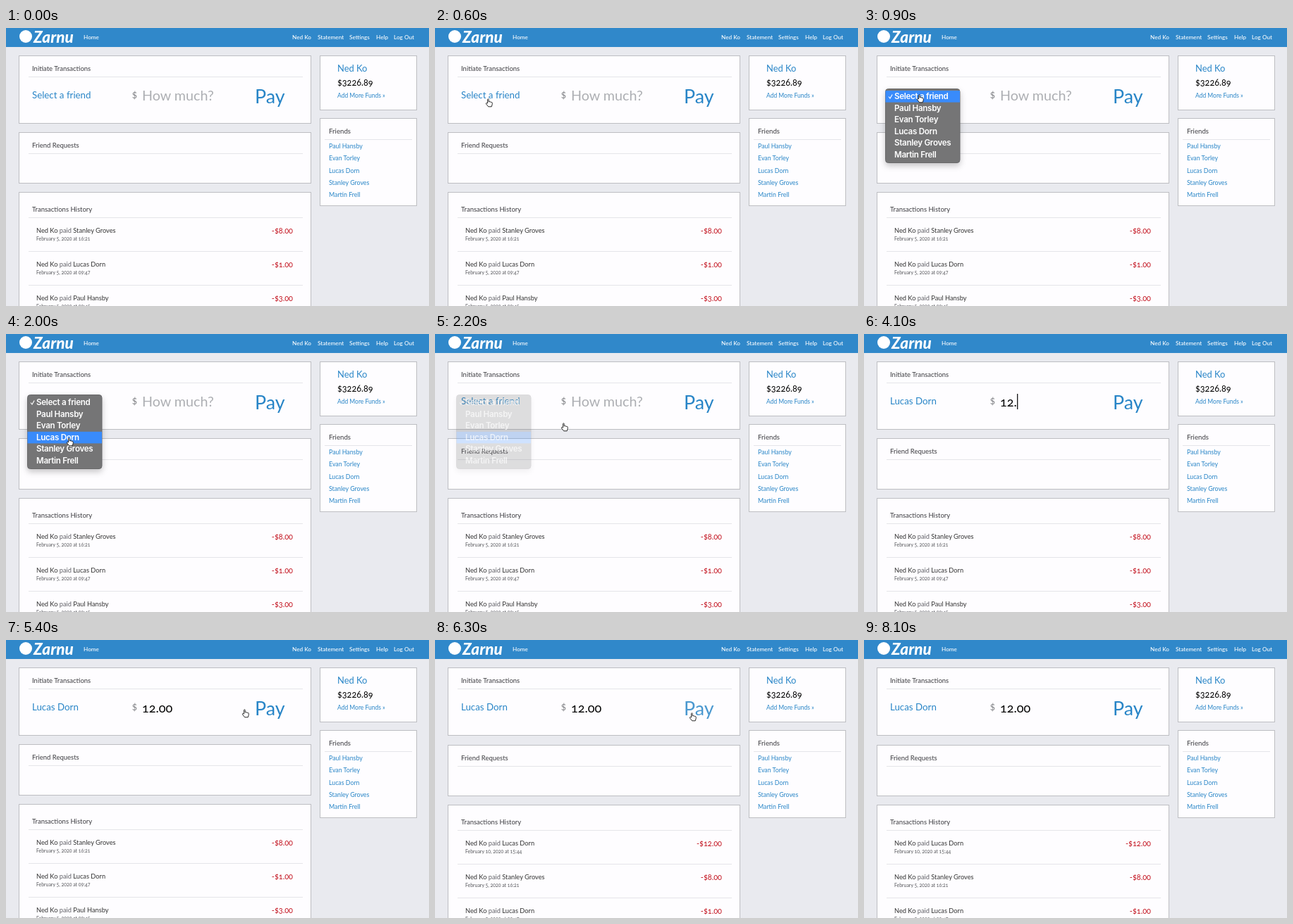
These frames come from a looping animation (600x395 px, 8300 ms). An HTML page:

```html
<!DOCTYPE html>
<html lang="en">
<head>
<meta charset="utf-8">
<title>Payment page</title>
<style>
  html, body { margin: 0; width: 100%; height: 100%; overflow: hidden; background: #e9eaef; }
  svg { display: block; width: 100%; height: 100%; }
  text { font-family: Lato, "Open Sans", sans-serif; font-variant-numeric: oldstyle-nums; white-space: pre; }
  .menu text { font-family: Inter, Roboto, sans-serif; font-weight: 600; letter-spacing: -.3px; }
  .panel { fill: #fefdff; stroke: #bdbec2; }
  .rule { stroke: #e5e5e9; }
</style>
</head>
<body>
<svg id="stage" viewBox="0 0 600 395">
  <defs>
    <filter id="shadow" x="-20%" y="-20%" width="140%" height="150%">
      <feDropShadow dx="0" dy="4" stdDeviation="4" flood-opacity=".22"/>
    </filter>
  </defs>
</svg>
<script>
const LOOP = 8300, STEP = 100;
const BLUE = '#2885c7', DARK = '#3c3c40', RED = '#c2101c';
const owner = 'Ned Ko';
const friends = ['Paul Hansby', 'Evan Torley', 'Lucas Dorn', 'Stanley Groves', 'Martin Frell'];
const picked = friends[2];
const stage = document.getElementById('stage');

function add(parent, tag, attrs = {}, content = '') {
  const node = document.createElementNS('http://www.w3.org/2000/svg', tag);
  for (const key in attrs) node.setAttribute(key, attrs[key]);
  node.textContent = content;
  return parent.appendChild(node);
}
const group = (parent, attrs) => add(parent, 'g', attrs);
const label = (parent, x, y, size, fill, content, extra = {}) =>
  add(parent, 'text', { x, y, 'font-size': size, fill, ...extra }, content);
const panel = (parent, x, y, width, height) =>
  add(parent, 'rect', { class: 'panel', x: x + .5, y: y + .5, width, height });
const rule = (parent, x1, x2, y) => add(parent, 'line', { class: 'rule', x1, x2, y1: y + .5, y2: y + .5 });
const show = (node, on) => node.setAttribute('visibility', on ? 'visible' : 'hidden');

// Header
add(stage, 'rect', { width: 600, height: 27, fill: '#3088ca' });
add(stage, 'circle', { cx: 28, cy: 12, r: 9, fill: '#fff' });
label(stage, 39, 20.5, 22.5, '#fff', 'Zarnu', { 'font-weight': 800, 'font-style': 'italic' });
[[110, 'Home'], [406, owner], [442, 'Statement'], [487, 'Settings'], [525, 'Help'], [550, 'Log Out']]
  .forEach(([x, word]) => label(stage, x, 15.6, 8.2, '#fff', word, { 'font-weight': 500 }));

// Payment form
panel(stage, 18, 39, 414, 96);
label(stage, 37, 61, 9.5, DARK, 'Initiate Transactions');
rule(stage, 32, 421, 69);
const choice = label(stage, 37, 100, 13.3, BLUE, '');
label(stage, 178.5, 100, 14.4, '#88898d', '$');
const hint = label(stage, 193, 102.5, 19.7, '#adafb3', 'How much?');
const amount = label(stage, 193, 102.5, 18, '#000', '');
const caret = add(stage, 'rect', { y: 85, width: 1.2, height: 22, fill: '#000' });
const pay = label(stage, 353, 106.5, 26.8, BLUE, 'Pay');

// Lower panels
const lower = group(stage);
panel(lower, 18, 148, 414, 72);
label(lower, 37, 170, 9.5, DARK, 'Friend Requests');
rule(lower, 32, 421, 178);
panel(lower, 18, 233, 414, 200);
label(lower, 37, 261, 9.5, DARK, 'Transactions History');
rule(lower, 32, 421, 269);

const feb = (day, clock) => `February ${day}, 2020 at ${clock}`;
const older = [
  [friends[3], feb(5, '16:21'), '8.00'],
  [picked, feb(5, '09:47'), '1.00'],
  [friends[0], feb(5, '09:45'), '3.00']
];
const newer = [[picked, feb(10, '15:44'), '12.00'], ...older.slice(0, 2)];

function history(items) {
  const list = group(lower);
  items.forEach(([name, date, sum], i) => {
    const y = 48 * i;
    const line = label(list, 43, 290.5 + y, 9.25, '#333', owner);
    add(line, 'tspan', { fill: '#606066' }, ' paid ');
    add(line, 'tspan', {}, name);
    label(list, 43, 302 + y, 6.9, '#55565a', date);
    label(list, 407, 291.8 + y, 10.9, RED, '-$' + sum, { 'text-anchor': 'end' });
    rule(list, 32, 421, 317 + y);
  });
  return list;
}
const before = history(older), after = history(newer);

// Side column
panel(stage, 445, 39, 137, 77);
label(stage, 470, 61.5, 12.9, BLUE, owner);
label(stage, 470, 82, 12.6, '#000', '$3226.89');
label(stage, 470, 98.8, 8.5, BLUE, 'Add More Funds »');
panel(stage, 445, 128, 137, 124);
label(stage, 458, 150, 9.7, DARK, 'Friends');
rule(stage, 452, 576, 158);
friends.forEach((name, i) => label(stage, 458, 171 + 17.25 * i, 8.8, BLUE, name));

// Drop-down
const ROW = 16.6, TOP = 89;
const menu = group(stage, { class: 'menu' });
const backing = group(menu);
add(backing, 'rect', { x: 30.5, y: 86.5, width: 105.5, height: 105, rx: 4,
  fill: '#747476', stroke: '#69696b', filter: 'url(#shadow)' });
const bar = add(backing, 'rect', { x: 30.5, width: 105.5, height: ROW, fill: '#398bfb' });
const options = group(menu);
['Select a friend', ...friends].forEach((name, i) => label(options, 43, 101 + ROW * i, 11.6, '#fff', name));
add(options, 'path', { d: 'M35 97.5l2 2.5 3.2-5.5', fill: 'none', stroke: '#fff', 'stroke-width': 1.2 });

// Pointer shapes
const ink = { fill: '#fff', stroke: '#111', 'stroke-width': .9, 'stroke-linejoin': 'round' };
const shapes = {
  arrow: add(stage, 'path', { ...ink, fill: '#111', stroke: '#fff', d: 'M0 0V11L2.6 8.7 4.3 12.3 6 11.5 4.4 8H7.8Z' }),
  hand: add(stage, 'path', { ...ink,
    d: 'M2.6 7V1.4Q3.4 0 4.2 1.4V4.8Q5.2 4 6 5.1Q7 4.4 7.7 5.5Q9 5 9.2 6.4V8.6L8.2 11.8H3.7L.5 7.8Q.2 6.2 1.6 6.5Z' }),
  beam: add(stage, 'path', { d: 'M0 0Q2 0 2 1.5V10.5Q2 12 0 12M4 0Q2 0 2 1.5M4 12Q2 12 2 10.5',
    fill: 'none', stroke: '#222', 'stroke-width': .9 })
};

// time, x, y, shape; an empty shape hides the pointer
const path = [
  [0, -12, 394, ''], [100, 0, 380, 'arrow'], [400, 46, 210, 'arrow'], [600, 72, 100, 'hand'],
  [900, 75, 94, 'hand'], [1100, 76, 101, 'hand'], [1500, 80, 126, 'hand'], [1800, 86, 147, 'hand'],
  [2000, 86, 147, 'hand'], [2100, 116, 140, 'hand'], [2200, 179, 126, 'hand'], [2500, 390, 112, 'arrow'],
  [2700, 452, 110, 'arrow'], [2900, 330, 98, 'beam'], [3100, 262, 92, 'beam'], [3700, 262, 92, ''],
  [5000, 262, 92, 'beam'], [5400, 335, 98, 'hand'], [5700, 361, 103, 'hand'], [6800, 361, 103, 'hand'],
  [7000, 420, 170, 'arrow'], [7400, 601, 390, '']
];
const typed = [[0, ''], [3700, '1'], [3900, '12'], [4100, '12.'], [4300, '12.0'], [4600, '12.00']];
const latest = (table, t) => table.filter(entry => entry[0] <= t).pop();

function pointerAt(t) {
  const a = latest(path, t), b = path[path.indexOf(a) + 1] || a;
  const k = a === b ? 0 : (t - a[0]) / (b[0] - a[0]);
  return { x: a[1] + (b[1] - a[1]) * k, y: a[2] + (b[2] - a[2]) * k, shape: a[3] };
}

function draw(t) {
  const { x, y, shape } = pointerAt(t);
  for (const name in shapes) {
    show(shapes[name], name === shape);
    shapes[name].setAttribute('transform', `translate(${x} ${y})`);
  }

  // While the menu fades, its backing goes before its text.
  const fading = t >= 2200;
  show(menu, t >= 800 && t < 2300);
  backing.setAttribute('opacity', fading ? .23 : 1);
  options.setAttribute('opacity', fading ? .7 : 1);
  const row = t >= 1800 ? 3 : Math.max(0, Math.min(3, Math.floor((y - TOP) / ROW)));
  bar.setAttribute('y', TOP + ROW * row);

  choice.textContent = t < 2300 ? 'Select a friend' : picked;
  const text = latest(typed, t)[1];
  amount.textContent = text;
  show(hint, !text);
  const blinkOff = (t >= 3300 && t < 3500) || (t >= 5200 && t < 5700);
  show(caret, t >= 3100 && t < 5900 && !blinkOff);
  caret.setAttribute('x', 193 + (text ? amount.getComputedTextLength() + .4 : -.4));
  pay.setAttribute('opacity', t >= 5500 && t < 7000 ? .84 : 1);

  const paid = t >= 6300;
  show(before, !paid);
  show(after, paid);
  lower.setAttribute('transform', `translate(0 ${paid ? 1 : 0})`);
}

const start = performance.now();
function tick() {
  const t = (performance.now() - start) % LOOP;
  draw(Math.floor(t / STEP) * STEP);
  requestAnimationFrame(tick);
}
tick();
</script>
</body>
</html>
```
